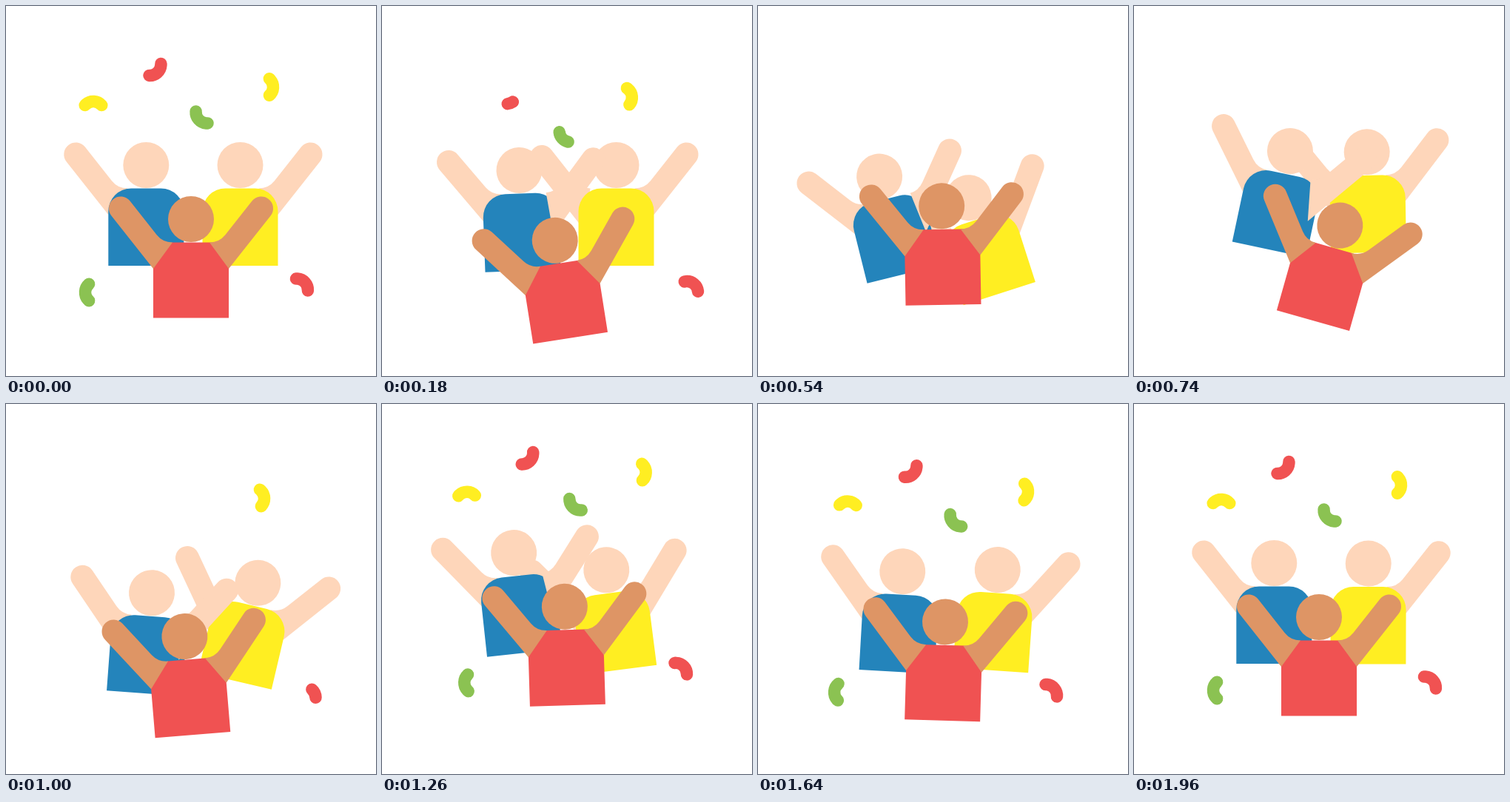
Recreate the animation shown at these times as an HTML page with a canvas. Size 500x500 px, loop 2000 ms.

```html
<!DOCTYPE html>
<html lang="en">
<head>
<meta charset="utf-8">
<title>Cheering friends</title>
<style>
html, body { margin: 0; width: 100%; height: 100%; overflow: hidden; background: #fff; }
canvas { display: block; width: 100vmin; height: 100vmin; }
</style>
</head>
<body>
<canvas id="stage" width="500" height="500"></canvas>
<script>
const ctx = document.getElementById('stage').getContext('2d');
const LOOP = 2, STEP = 0.02, MOVE = 1.8;
const SKIN = '#fed6ba', BROWN = '#de9565', RED = '#f05252';
const BLUE = '#2484bb', YELLOW = '#ffee22', GREEN = '#8bc252';

// Turning points, evenly spread over MOVE seconds: pixels down, degrees.
const BOUNCE = [0, 42, -24, 40, -17, 11.5, 0];
const SWAY = [0, -18, 16, -7.5, 4, 0];

const clamp = v => Math.max(0, Math.min(1, v));
const ease = p => (1 - Math.cos(Math.PI * p)) / 2;

function swing(points, t) {
  const last = points.length - 1;
  const pos = clamp(t / MOVE) * last;
  const i = Math.min(Math.floor(pos), last - 1);
  return points[i] + (points[i + 1] - points[i]) * ease(pos - i);
}

// Runs draw with (x, y) as origin, swinging about a point `drop` below it.
function posed(x, y, drop, t, draw) {
  ctx.save();
  ctx.translate(x, y + drop + swing(BOUNCE, t));
  ctx.rotate(swing(SWAY, t) * Math.PI / 180);
  ctx.translate(0, -drop);
  draw();
  ctx.restore();
}

const friend = (x, y, t, draw) => posed(x, y, 72.5, t, draw);

function head(color) {
  ctx.fillStyle = color;
  ctx.beginPath();
  ctx.arc(0, -31.5, 31, 0, Math.PI * 2);
  ctx.fill();
}

function torso(color, height, corner) {
  ctx.fillStyle = color;
  ctx.beginPath();
  ctx.roundRect(-51, 0, 102, height, [corner, corner, 0, 0]);
  ctx.fill();
}

// A raised arm, from the hand down to the shoulder line at y = 0.
function arm(side, color, x = -95, y = -46, neck = -25, base = -51) {
  const r = 16, dx = 0.62, dy = 0.785;
  const inX = x + r * dy, inY = y - r * dx;
  const outX = x - r * dy, outY = y + r * dx;
  const pitX = inX - inY * dx / dy;
  const lean = Math.atan2(dy, dx);
  ctx.save();
  ctx.scale(side, 1);
  ctx.fillStyle = color;
  ctx.beginPath();
  ctx.arc(x, y, r, lean + Math.PI / 2, lean + Math.PI * 1.5);
  ctx.lineTo(pitX - 13 * dx, -13 * dy);
  ctx.quadraticCurveTo(pitX, 0, neck, 0);
  ctx.lineTo(base, outY + (base - outX) * dy / dx);
  ctx.fill();
  ctx.restore();
}

// The arm between the two back friends grows out and slips away again.
function innerArm(side, t) {
  const k = ease(clamp(t / 0.16)) * (1 - ease(clamp((t - 1.4) / 0.16)));
  const x = side * -43, y = 53;
  ctx.save();
  ctx.translate(x, y);
  ctx.scale(k, k);
  ctx.translate(-x, -y);
  arm(side, SKIN, -100.5, -42.5, -35, -43);
  ctx.restore();
}

function drawFriends(t) {
  friend(316.5, 246.5, t - 0.2, () => {
    innerArm(1, t);
    arm(-1, SKIN);
    torso(YELLOW, 104.5, 31);
    head(SKIN);
  });
  friend(189.3, 246.5, t - 0.1, () => {
    arm(1, SKIN);
    torso(BLUE, 104.5, 31);
    innerArm(-1, t);
    head(SKIN);
  });
  friend(250, 319.5, t, () => {
    torso(RED, 102, 26);
    arm(1, BROWN);
    arm(-1, BROWN);
    head(BROWN);
  });
}

// Colour, place and the direction of the bulge in degrees.
const BEANS = [
  [YELLOW, 356, 109.5, 0],
  [RED, 400, 376.5, -45],
  [GREEN, 264.5, 150.5, 135],
  [RED, 201.5, 86, 45],
  [YELLOW, 118, 134, -90],
  [GREEN, 112, 387, 180]
];

// Beans are wiped away last to first and drawn again first to last.
function bean([color, x, y, turn], i, t) {
  const leave = 0.245 - 0.045 * i;
  const back = 0.87 + 0.25 * (i / 5) ** 0.7;
  const k = t < 0.6 ? 1 - clamp((t - leave) / 0.1) : clamp((t - back) / 0.1);
  if (k <= 0) return;
  const half = 0.85;
  ctx.save();
  ctx.translate(x - 250, y - 250);
  ctx.rotate(turn * Math.PI / 180);
  ctx.strokeStyle = color;
  ctx.lineWidth = 16.5;
  ctx.lineCap = 'round';
  ctx.beginPath();
  ctx.arc(-10, 0, 15, half, half * (1 - 2 * k), true);
  ctx.stroke();
  ctx.restore();
}

function draw(t) {
  ctx.fillStyle = '#fff';
  ctx.fillRect(0, 0, 500, 500);
  posed(250, 250, 0, t, () => BEANS.forEach((b, i) => bean(b, i, t)));
  drawFriends(t);
}

const began = performance.now();
function frame() {
  const t = (performance.now() - began) / 1000 % LOOP;
  draw(Math.min(Math.floor(t / STEP) * STEP, LOOP - 2 * STEP));
  requestAnimationFrame(frame);
}
frame();
</script>
</body>
</html>
```
